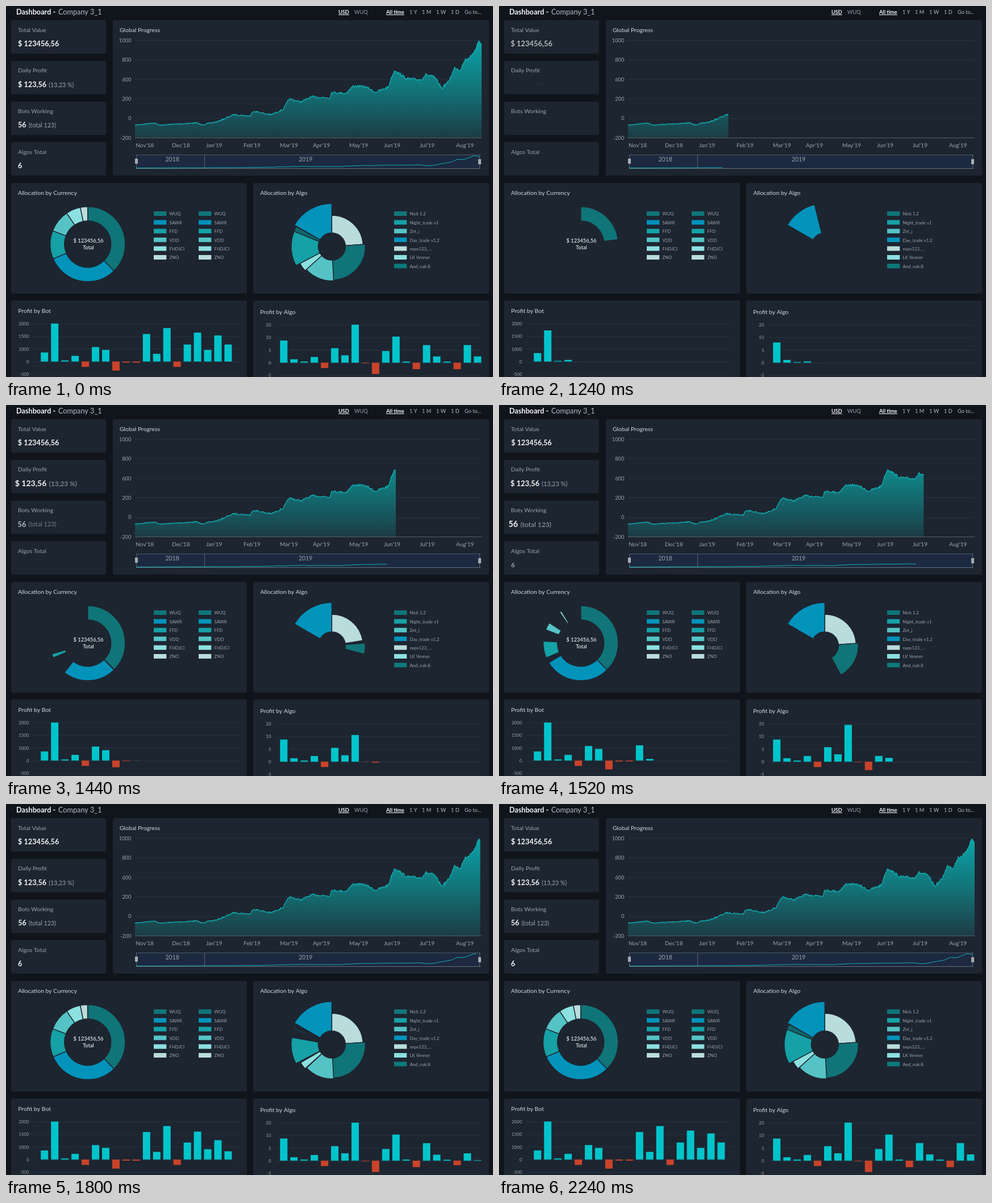
Animation, 857 px wide and 654 px high, one loop 2840 ms. Source, as an HTML page with a canvas:

```html
<!DOCTYPE html>
<html lang="en">
<head>
<meta charset="utf-8">
<title>Dashboard</title>
<style>
html, body { margin: 0; height: 100%; overflow: hidden; background: #10151c; }
canvas { display: block; }
</style>
</head>
<body>
<canvas width="857" height="654"></canvas>
<script>
const ctx = document.querySelector('canvas').getContext('2d');
const LOOP = 2840;
const PANEL = '#1d2530', GRID = '#213341', DIM = '#9ba4ad', SOFT = '#d3d9df', WHITE = '#f0f4f6';
const DARK = '#107578', BLUE = '#0293bb', TEAL = '#15a1a6', AQUA = '#55c3c5', PALE = '#8ce0e0', MIST = '#b9dcdc';

const clamp = v => Math.max(0, Math.min(1, v));

// cubic-bezier(.25, .1, .25, 1)
function ease(u) {
  if (u <= 0 || u >= 1) return clamp(u);
  let lo = 0, hi = 1, s;
  for (let i = 0; i < 24; i++) {
    s = (lo + hi) / 2;
    const x = .75 * (1 - s) * s + s ** 3;
    if (x < u) lo = s; else hi = s;
  }
  return .3 * (1 - s) ** 2 * s + 3 * (1 - s) * s * s + s ** 3;
}
const grow = (t, start, length) => ease((t - start) / length);

let seed = 7;
const random = () => (seed = seed * 16807 % 2147483647) / 2147483647;

// Joins key points by a line with seeded jitter that grows to the right
function noisyLine(points, step, jitter, jitterGrowth) {
  const line = [], first = points[0][0], last = points[points.length - 1][0];
  for (let x = first, i = 1; x <= last; x += step) {
    while (x > points[i][0]) i++;
    const [x0, y0] = points[i - 1], [x1, y1] = points[i];
    const y = y0 + (y1 - y0) * (x - x0) / (x1 - x0);
    line.push([x, y + (random() - .5) * (jitter + (x - first) * jitterGrowth)]);
  }
  return line;
}
const trend = noisyLine([
  [227, 210], [262, 206], [269, 210], [336, 206], [343, 209.5], [372, 204], [401, 191.5], [430, 194],
  [435, 185], [466, 192], [488, 182], [498, 164], [519, 169], [538, 160], [570, 162], [573, 152],
  [598, 154], [611, 141], [632, 142], [650, 152], [673, 143], [677, 130], [684, 113], [705, 128],
  [730, 130], [739, 121], [754, 125], [767, 145], [779, 133], [790, 108], [799, 113], [808, 95],
  [820, 88], [832, 62], [837.5, 68]
], 1.25, 1.4, .006);
const overview = noisyLine([
  [229, 285.5], [440, 284.7], [510, 282.8], [588, 283], [620, 281.3], [728, 280], [745, 282],
  [785, 275], [793, 270.5], [805, 271], [825, 263.5], [834, 266]
], 5, .1, .001);

function rect(x, y, w, h, color) {
  ctx.fillStyle = color;
  ctx.fillRect(x, y, w, h);
}

function panel(x, y, w, h) {
  ctx.fillStyle = PANEL;
  ctx.beginPath();
  ctx.roundRect(x, y, w, h, 3);
  ctx.fill();
}

// y is the middle of the capitals
function text(str, x, y, size, color = DIM, weight = 400, align = 'left') {
  ctx.font = `${weight} ${size}px Lato, sans-serif`;
  ctx.textAlign = align;
  ctx.fillStyle = color;
  ctx.fillText(str, x, y + size * .36);
  return ctx.measureText(str).width;
}

function polyline(points) {
  ctx.beginPath();
  for (const [x, y] of points) ctx.lineTo(x, y);
}

function strokeLine(points, width) {
  polyline(points);
  ctx.strokeStyle = '#10b0b4';
  ctx.lineWidth = width;
  ctx.stroke();
}

function reveal(x, width, draw) {
  ctx.save();
  ctx.beginPath();
  ctx.rect(x, 55, width, 235);
  ctx.clip();
  draw();
  ctx.restore();
}

function header() {
  text('Dashboard -', 18, 10, 12.7, WHITE, 700);
  text('Company 3_1', 92, 10, 12.7, '#b5bcc4');
  text('WUQ', 613, 10.5, 9.2);
  for (const [label, x] of [['USD', 585], ['All time', 669]]) {
    rect(x, 15, text(label, x, 10.5, 9.2, WHITE, 700), 1, WHITE);
  }
  for (const [label, x] of [['1 Y', 710], ['1 M', 732], ['1 W', 757], ['1 D', 783], ['Go to...', 807]]) {
    text(label, x, 10.5, 9.2, '#b5bcc4');
  }
}

function card(index, title, value, note, t) {
  const y = 25 + 71.7 * index, middle = y + 41.5, age = t - 1130 - 100 * index;
  panel(9, y, 167, 59);
  text(title, 21, y + 17, 10.4);
  if (age <= 0) return;
  const scale = 1 - Math.exp(-age / 95) * Math.cos(age * 2 * Math.PI / 430);
  const center = 21 + (value.length + note.length * .8) * 3.2;
  ctx.save();
  ctx.globalAlpha = clamp((age + 30) / 200);
  ctx.translate(center, middle);
  ctx.scale(scale, scale);
  ctx.translate(-center, -middle);
  const width = text(value, 21, middle, 12.7, WHITE, 700);
  text(note, 25 + width, middle + .5, 10.7);
  ctx.restore();
}

function progress(t) {
  panel(188, 25, 662, 274);
  text('Global Progress', 200, 42, 10.4, SOFT);
  [1000, 800, 600, 200, 0, -200].forEach((label, i) => {
    const y = 60 + 34.4 * i;
    rect(227, Math.round(y), 610, 1, i < 5 ? GRID : '#53606b');
    text(label, 220.5, y + .5, 9.4, DIM, 400, 'right');
  });
  reveal(227, 610 * grow(t, 1087, 780), () => {
    const shade = ctx.createLinearGradient(0, 60, 0, 232);
    shade.addColorStop(0, '#0aa3a7');
    shade.addColorStop(.5, '#127579');
    shade.addColorStop(1, '#1c3c45');
    polyline([[227, 232], ...trend, [837, 232]]);
    ctx.fillStyle = shade;
    ctx.fill();
    strokeLine(trend, 1.3);
  });
  const monthX = [228, 292, 352, 418, 482, 540, 604, 665, 728, 792];
  'Nov Dec Jan Feb Mar Apr May Jun Jul Aug'.split(' ')
    .forEach((month, i) => text(`${month}’${i < 2 ? 18 : 19}`, monthX[i], 245, 10.1));

  rect(229, 262, 606, 24, '#1c2940');
  rect(229, 262, 606, 1, '#4d5a6a');
  rect(229, 286, 606, 1, '#63707d');
  for (const x of [229, 349, 833]) rect(x, 262, 1, 24, '#5a6674');
  text('2018', 280.5, 270.5, 10.5);
  text('2019', 515, 270.5, 10.5);
  reveal(229, 604 * grow(t, 1087, 810), () => strokeLine(overview, 1));
  rect(227, 269, 5, 9, '#a5abb1');
  rect(831, 270, 5, 9, '#a5abb1');
}

// Slices are [span in degrees, outer radius, color]; each waits for the angle before it
function slices(cx, cy, inner, from, list, start, pace, length, t) {
  const rad = degrees => (degrees - 90) * Math.PI / 180;
  let swept = 0;
  for (const [span, outer, color] of list) {
    const p = grow(t, start + pace * swept ** .9, length);
    const a = rad(from + swept), b = rad(from + swept + span * p);
    swept += span;
    if (!p) continue;
    ctx.beginPath();
    ctx.arc(cx, cy, outer, a, b);
    ctx.arc(cx, cy, inner, b, a, true);
    ctx.closePath();
    ctx.fillStyle = color;
    ctx.fill();
    ctx.strokeStyle = PANEL;
    ctx.lineWidth = 1.4;
    ctx.stroke();
  }
}

const currencySlices = [[135.6, 66, DARK], [111.4, 66, BLUE], [44, 66, TEAL], [35, 66, AQUA], [22.7, 66, PALE], [11.3, 66, MIST]];
const algoSlices = [[60, 76, BLUE], [86, 55, MIST], [91, 59, DARK], [51, 60.5, AQUA], [14, 63.5, PALE], [50, 71.5, TEAL], [7.5, 72, '#0f686c']];

function legend(x, rows) {
  rows.forEach(([label, color], i) => {
    const y = 366 + 15.4 * i;
    rect(x, y - 4, 22.3, 8, color);
    text(label, x + 27.5, y + .5, 7.8);
  });
}

function allocations(t) {
  panel(9, 312, 415, 195);
  panel(435, 312, 415, 195);
  text('Allocation by Currency', 21, 329, 10.4, SOFT);
  text('Allocation by Algo', 447.5, 329, 10.4, SOFT);
  slices(143.8, 419.8, 41, 0, currencySlices, 1110, 2, 370, t);
  text('$ 123456,56', 145, 413.5, 9.3, WHITE, 500, 'center');
  text('Total', 145, 426, 9.1, WHITE, 500, 'center');
  slices(573.4, 424, 24, 300, algoSlices, 1100, 3.3, 300, t);
  const coins = [['WUQ', DARK], ['SAWR', BLUE], ['FFD', TEAL], ['VDD', AQUA], ['FHDJCI', PALE], ['ZNO', MIST]];
  legend(260, coins);
  legend(339, coins);
  legend(683, [['Nick 1.2', DARK], ['Night_trade v1', TEAL], ['Zet_j', AQUA], ['Day_trade v1.2', BLUE],
    ['nxps123_...', MIST], ['LK Venner', PALE], ['And_nak:8', '#0d7a7c']]);
}

function bars(title, left, titleY, top, labels, firstBar, heights, start, t) {
  panel(left, 519, 415, 140);
  text(title, left + 12.3, titleY, 10.4, SOFT);
  labels.forEach((label, i) => {
    const y = top + 22.3 * i;
    rect(left + 39, Math.round(y), 363, 1, GRID);
    text(label, left + 31.5, y + .5, 7.9, DIM, 400, 'right');
  });
  heights.forEach((height, i) => {
    const size = height * grow(t, start + 36 * i, 225);
    rect(firstBar + 17.95 * i, top + 67, 13, -size, height > 0 ? '#00c4cb' : '#c9432a');
  });
}

const botProfit = [16, 67, 2, 10, -9.5, 25.5, 20.5, -16, -2, -2, 48.5, 13.5, 59, -9.5, 30, 51, 20.5, 46, 30];
const algoProfit = [39, 6, 2, 10, -9.5, 25.5, 13, 67, -1, -20, 20.5, 46, 2, -11.5, 31, 11, 2, -11.5, 31, 11];

function draw() {
  const clock = performance.now() % LOOP;
  const t = clock < 1000 ? LOOP : clock; // the finished state rests before the replay
  rect(0, 0, 857, 654, '#10151c');
  header();
  card(0, 'Total Value', '$ 123456,56', '', t);
  card(1, 'Daily Profit', '$ 123,56', '(13,23 %)', t);
  card(2, 'Bots Working', '56', '(total 123)', t);
  card(3, 'Algos Total', '6', '', t);
  progress(t);
  allocations(t);
  bars('Profit by Bot', 9, 537, 559.7, [2000, 1500, 1000, 0, -500], 61.3, botProfit, 1089, t);
  bars('Profit by Algo', 435, 539.5, 561.7, [20, 10, 5, 0, -5], 482.3, algoProfit, 1096, t);
  requestAnimationFrame(draw);
}
draw();
</script>
</body>
</html>
```
